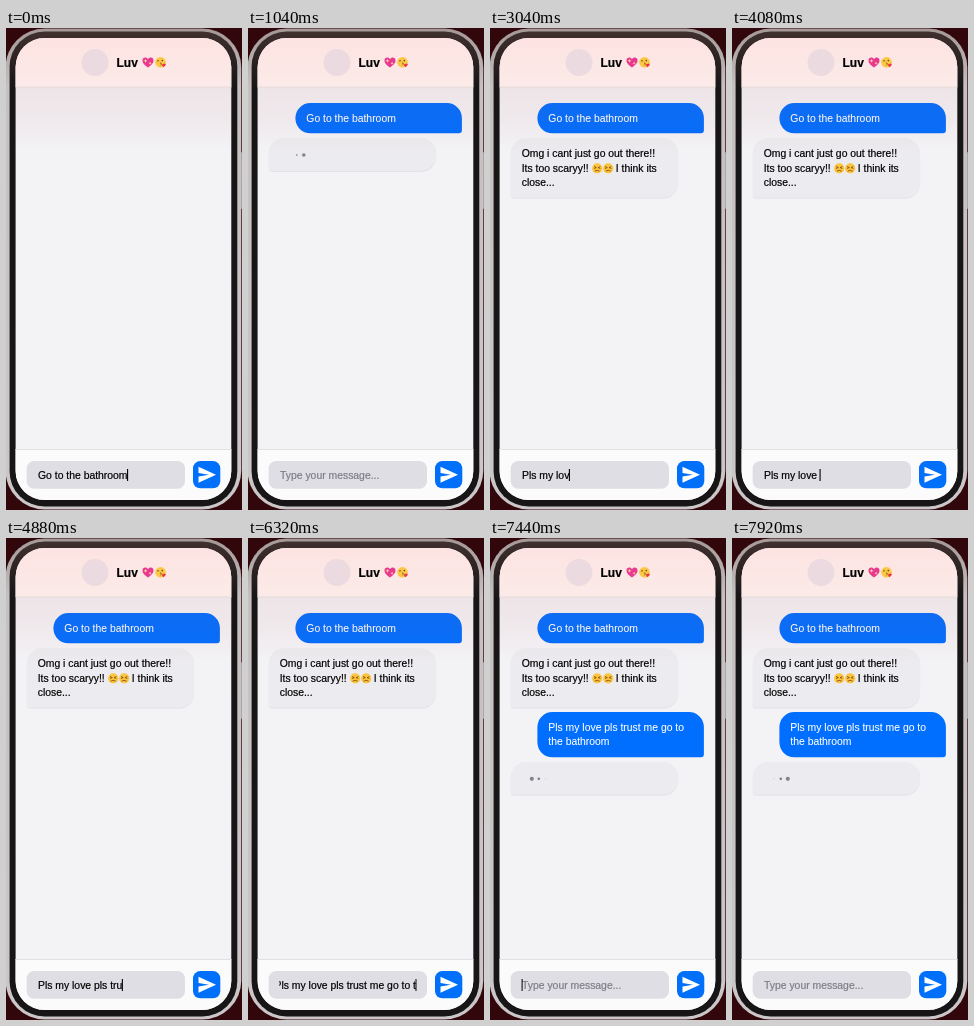
These frames come from a looping animation (236 by 482 pixels, 8 s). An HTML page:

```html
<!DOCTYPE html>
<html lang="en">
<head>
<meta charset="utf-8">
<title>Chat</title>
<style>
  html, body { margin: 0; width: 100%; height: 100%; overflow: hidden; background: #32070b; }
  svg { display: block; }
  text { font: 10.4px "Liberation Sans", Arial, sans-serif; white-space: pre; stroke: #000; stroke-width: .2px; }
  .name { font-weight: bold; font-size: 12px; }
  .mine text { fill: #fff; stroke: #fff; stroke-width: .1px; }
  .mine path { fill: #006eff; }
  .theirs > path { fill: #ecebef; }
  .theirs > .shade { fill: #dfdee3; }
  #hint { fill: #7d7c84; stroke: #7d7c84; }
</style>
</head>
<body>
<svg width="236" height="482" viewBox="0 0 236 482">
  <defs>
    <linearGradient id="head" x1="0" y1="0" x2="0" y2="1">
      <stop offset="0" stop-color="#fde3e2"/><stop offset="1" stop-color="#fbebe8"/>
    </linearGradient>
    <linearGradient id="glow" x1="0" y1="0" x2="0" y2="1">
      <stop offset="0" stop-color="#b85058" stop-opacity=".09"/>
      <stop offset=".5" stop-color="#b85058" stop-opacity=".06"/>
      <stop offset="1" stop-color="#b85058" stop-opacity="0"/>
    </linearGradient>
    <linearGradient id="metal" x1="0" y1="0" x2="0" y2="1">
      <stop offset="0" stop-color="#a39896"/><stop offset=".12" stop-color="#c6c0c1"/>
      <stop offset="1" stop-color="#cbc6c7"/>
    </linearGradient>
    <linearGradient id="bezel" x1="0" y1="0" x2="0" y2="1">
      <stop offset="0" stop-color="#40302e"/><stop offset=".12" stop-color="#171516"/>
    </linearGradient>
    <clipPath id="screen"><rect x="9.600" y="10" width="215.700" height="462" rx="29"/></clipPath>
    <clipPath id="field"><rect x="31.200" y="434" width="137.600" height="26"/></clipPath>
    <g id="heart">
      <path d="M5.5 10.5C1.5 7.5 0 5.7 0 3.4C0 .2 4.1-.4 5.5 2.3C6.9-.4 11 .2 11 3.4C11 5.7 9.5 7.5 5.5 10.5Z" fill="#e8388f"/>
      <path d="M3 1.800l.6 1.400 1.400.6-1.400.6L3 5.800l-.6-1.400L1 3.800l1.400-.6zM7.600 4.600l.5 1.100 1.100.5-1.100.5-.5 1.100-.5-1.100L6 6.200l1.100-.5z" fill="#ffc9a0"/>
    </g>
    <g id="kiss">
      <circle cx="5.500" cy="5.500" r="5.300" fill="#fdc746"/>
      <path d="M2 4.400Q3 3.300 4.100 4.200M5.300 6q1.600.2.500 1.100q1.300.4-.4 1.200" fill="none" stroke="#65411c" stroke-width=".8"/>
      <circle cx="7.300" cy="3.800" r=".8" fill="#65411c"/>
      <path d="M8.600 10.500C6.600 9 6.600 6.800 8.300 7.300C9.500 5.900 11.200 7 10.700 8.200Z" fill="#ee3345"/>
    </g>
    <g id="worry">
      <circle cx="5.200" cy="5.200" r="5.100" fill="#fcc540"/>
      <path d="M2 3.300L4.300 4.400L2 5.300M8.400 3.300L6.100 4.400L8.400 5.300M2.700 8Q5.200 6.200 7.700 8" fill="none" stroke="#76420f" stroke-width=".8"/>
    </g>
  </defs>

  <rect width="236" height="482" fill="#32070b"/>
  <rect x="234" y="124" width="2" height="57" rx="1" fill="#a09a9b"/>
  <rect x="-.4" y=".5" width="235.700" height="481" rx="39" fill="url(#metal)"/>
  <rect x="3.600" y="3.500" width="227.700" height="475" rx="35" fill="url(#bezel)"/>

  <g clip-path="url(#screen)">
    <rect x="9" y="10" width="217" height="462" fill="#f3f3f6"/>
    <g id="chat"></g>
    <rect x="9" y="59" width="217" height="66" fill="url(#glow)"/>

    <rect x="9" y="10" width="217" height="49" fill="url(#head)"/>
    <rect x="9" y="58.500" width="217" height="1" fill="#ead9da"/>
    <circle cx="89" cy="34.500" r="13.500" fill="#ebdadf"/>
    <text class="name" x="110.500" y="38.500">Luv</text>
    <use href="#heart" x="136.500" y="29"/>
    <use href="#kiss" x="149" y="28.800"/>

    <rect x="9" y="421" width="217" height="51" fill="#fbfbfc"/>
    <rect x="9" y="421" width="217" height="1" fill="#e1e0e4"/>
    <rect x="20.700" y="433" width="158.300" height="27.800" rx="7.500" fill="#dfdee4"/>
    <g clip-path="url(#field)">
      <text id="hint" x="32" y="450.500">Type your message...</text>
      <text id="draft" x="32" y="450.500"></text>
      <rect id="caret" y="441" width="1.100" height="12"/>
    </g>
    <rect x="187" y="433" width="27.300" height="27.300" rx="7.300" fill="#0070fb"/>
    <path d="M192.500 438.700L210 446.700L192.500 454.700V448.500L203 446.700L192.500 444.900Z" fill="#fff"/>
  </g>
</svg>
<script>
const LOOP = 8000, STEP = 80;
const FIRST = 'Go to the bathroom';
const SECOND = 'Pls my love pls trust me go to the bathroom';
const SEND1 = 320, REPLY = 1440, SEND2 = 7280;
// time and number of letters typed
const KEYS = [[2160, 0], [3040, 10], [3200, 11], [4080, 12], [4880, 19], [6320, 32], [6720, 37], [7120, 43]];

const $ = id => document.getElementById(id);
const chat = $('chat'), draft = $('draft'), hint = $('hint'), caret = $('caret');

function bubble(x, y, h, mine) {
  const w = mine ? 166.5 : 167.3, r = Math.min(15, h / 2), s = 3;
  const br = mine ? s : r, bl = mine ? r : s;
  return `M${x + r} ${y}h${w - 2 * r}a${r} ${r} 0 0 1 ${r} ${r}v${h - r - br}a${br} ${br} 0 0 1 ${-br} ${br}` +
    `h${br + bl - w}a${bl} ${bl} 0 0 1 ${-bl} ${-bl}v${r + bl - h}a${r} ${r} 0 0 1 ${r} ${-r}z`;
}

function message(from, to, mine, y, h, lines, extra = '') {
  const x = mine ? 47.4 : 20.8;
  const g = document.createElementNS('http://www.w3.org/2000/svg', 'g');
  g.setAttribute('class', mine ? 'mine' : 'theirs');
  const shade = mine ? '' : `<path class="shade" d="${bubble(x, y + 0.8, h, mine)}"/>`;
  g.innerHTML = shade + `<path d="${bubble(x, y, h, mine)}"/>` +
    lines.map((s, i) => `<text x="${x + 10.9}" y="${y + 18.8 + i * 14.56}">${s}</text>`).join('') + extra;
  chat.append(g);
  return { g, from, to };
}

const dots = y => [41.8, 48.8, 55.8].map(x => `<circle class="dot" cx="${x}" cy="${y}" fill="#85848c"/>`).join('');
const faces = '<use href="#worry" x="102" y="135.200"/><use href="#worry" x="113" y="135.200"/>' +
  '<text x="125.800" y="143.900">I think its</text>';

const messages = [
  message(SEND1, LOOP, true, 75, 30.3, [FIRST]),
  message(SEND1, REPLY, false, 110, 33, [], dots(127)),
  message(REPLY, LOOP, false, 110.3, 59.5, ['Omg i cant just go out there!!', 'Its too scaryy!!', 'close...'], faces),
  message(SEND2, LOOP, true, 174, 45.3, ['Pls my love pls trust me go to', 'the bathroom']),
  message(SEND2, LOOP, false, 224, 32.8, [], dots(240.8)),
];

function typed(t) {
  if (t < KEYS[0][0]) return 0;
  for (let i = 1; i < KEYS.length; i++) {
    const [a, m] = KEYS[i - 1], [b, n] = KEYS[i];
    if (t < b) return Math.floor(m + (n - m) * (t - a) / (b - a) + 0.001);
  }
  return SECOND.length;
}

const ease = p => (1 - Math.cos(Math.PI * p)) / 2;

function dotSize(ms) {
  const p = (ms % 1400) / 1400;
  return p < 0.4 ? ease(p / 0.4) : p < 0.8 ? ease((0.8 - p) / 0.4) : 0;
}

function draw(t) {
  for (const { g, from, to } of messages) {
    const age = t - from, on = age >= 0 && t < to;
    g.style.display = on ? '' : 'none';
    if (!on) continue;
    const p = Math.min(1, (age + STEP) / 240);
    g.setAttribute('opacity', p);
    g.setAttribute('transform', `translate(0 ${6 * (1 - p) ** 2})`);
    g.querySelectorAll('.dot').forEach((d, i) => d.setAttribute('r', 2.2 * dotSize(age + 320 - i * 160)));
  }

  const text = t < SEND1 ? FIRST : t < SEND2 ? SECOND.slice(0, typed(t)) : '';
  draft.textContent = text;
  hint.style.display = text ? 'none' : '';
  const width = text ? draft.getComputedTextLength() : 0;
  const x = 32 + Math.min(0, 136 - width);
  draft.setAttribute('x', x);
  caret.setAttribute('x', x + width - 0.5);

  const since = t < SEND1 ? 0 : t < KEYS[0][0] ? t - SEND1 : t < SEND2 ? 0 : t - SEND2;
  // the caret also blinks in the long pause
  const idle = t >= 3200 && t < 4080 ? t - 3200 : since;
  caret.style.display = idle % 1000 < 500 ? '' : 'none';
}

const start = performance.now();
function tick(now) {
  const t = Math.max(0, now - start) % LOOP;
  draw(Math.floor(t / STEP) * STEP);
  requestAnimationFrame(tick);
}
draw(0);
requestAnimationFrame(tick);
</script>
</body>
</html>
```
